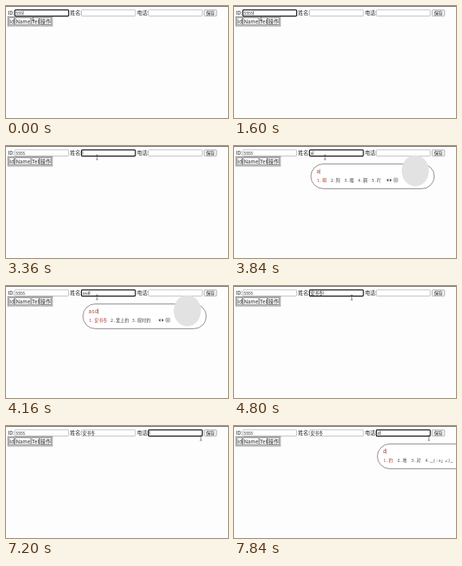
These frames come from a looping animation (278x140 px, 8 s). An HTML page:

```html
<!DOCTYPE html>
<html>
<head>
<meta charset="utf-8">
<style>
  html, body { margin: 0; height: 100%; overflow: hidden; background: #fdfdfd; }
  svg { display: block; width: 100vw; height: 100vh; }
  text { font: 6.4px "Noto Sans CJK SC", "Noto Sans", sans-serif; fill: #222; white-space: pre; }
  .value { font-size: 5.3px; }
  .box { fill: #fff; stroke: #999; stroke-width: .6; }
  .focus .box { stroke: #111; stroke-width: 1.2; }
  .caret { stroke: #111; stroke-width: .5; visibility: hidden; }
  .focus .caret { visibility: visible; }
  .cell { fill: none; stroke: #777; stroke-width: .8; }
  #popup text { font: 5.5px "Noto Sans Mono", "Noto Sans CJK SC", monospace; fill: #444; }
  #popup .hot { fill: #b8402f; }
  #popup #typed { font-size: 6.6px; }
</style>
</head>
<body>
<svg viewBox="0 0 278 140">
  <path d="M0 .4H278" stroke="#333" stroke-width=".8"/>
  <g id="page"></g>
  <g id="popup">
    <rect y="22.4" width="154.5" height="31" rx="15.5" fill="#fff" stroke="#7c6c6c" stroke-width=".8"/>
    <text id="typed" class="hot" y="34"></text>
    <path id="mark" stroke="#555" stroke-width=".5"/>
    <g id="choices"></g>
    <g id="pager">
      <path d="M193.4 40.7v4l-2.4-2zM195.2 40.7v4l2.4-2z" fill="#444"/>
      <rect x="200.3" y="40.3" width="4.6" height="4.6" rx=".8" fill="#fff" stroke="#555" stroke-width=".6"/>
      <path d="M201.4 42.6h2.4M202.6 41.4v2.4" stroke="#555" stroke-width=".6"/>
      <ellipse cx="227" cy="31" rx="17" ry="19.5" fill="#e2e2e2"/>
    </g>
  </g>
  <path id="ibeam" d="M-1.4-3H1.4M0-3V3M-1.4 3H1.4" fill="none" stroke="#444" stroke-width=".6"/>
  <path id="arrow" d="M0 0V6.6L1.6 5.2 2.7 7.6 3.7 7.1 2.6 4.8H4.7Z" fill="#fff" stroke="#222" stroke-width=".5"/>
</svg>
<script>
const LOOP = 8000, STEP = 160, NAME = '安书冬';
const $ = id => document.getElementById(id);
const label = (x, y, s, attrs = '') => `<text x="${x}" y="${y}" ${attrs}>${s}</text>`;

const field = (id, x, caption, captionX) => label(captionX, 11, caption) +
  `<g id="${id}"><rect class="box" x="${x}" y="4.8" width="67.5" height="7.8" rx="1"/>
   <text class="value" x="${x + 1.2}" y="10.7"></text><path class="caret"/></g>`;
const cell = (x, w, s) =>
  `<rect class="cell" x="${x}" y="14.7" width="${w}" height="8.8"/>` +
  label(x + w / 2, 21.5, s, 'text-anchor="middle"');

$('page').innerHTML =
  field('id', 11, 'ID:', 2.5) + field('name', 94.5, '姓名:', 80.3) + field('tel', 178.3, '电话:', 164) +
  '<rect x="248.2" y="4.8" width="15.6" height="7.8" rx="1" fill="#efefef" stroke="#888" stroke-width=".6"/>' +
  label(256, 10.7, '保存', 'class="value" text-anchor="middle"') +
  '<rect class="cell" x="2.4" y="13.2" width="55.6" height="11.8"/>' +
  cell(3.9, 6.7, 'Id') + cell(11.8, 19.1, 'Name') + cell(32.1, 9.5, 'Tel') + cell(42.8, 13.8, '操作');

// time, x, y of the mouse
const path = [
  [0, 34, 15.5], [1600, 34, 15.5], [2560, 106, 17], [2720, 109.8, 13], [2880, 109.8, 13],
  [3360, 114, 14], [4320, 114, 14], [4800, 147.5, 14.3], [5600, 233.5, 12.2],
  [6880, 233.5, 12.2], [7200, 244, 15], [LOOP, 244, 15]
];

function mouseAt(t) {
  const i = path.findIndex(p => p[0] > t);
  const [a, b] = [path[i - 1], path[i]];
  const k = (t - a[0]) / (b[0] - a[0]);
  return [a[1] + (b[1] - a[1]) * k, a[2] + (b[2] - a[2]) * k];
}

const endOf = text => +text.getAttribute('x') +
  (text.textContent ? text.getComputedTextLength() : 0) + .4;

function setField(id, value, focused) {
  const g = $(id), text = g.querySelector('text');
  text.textContent = value;
  g.classList.toggle('focus', focused);
  g.querySelector('.caret').setAttribute('d', `M${endOf(text)} 6.2V11.2`);
}

function showPopup(x, typed, words, gap, pager) {
  $('popup').querySelector('rect').setAttribute('x', x);
  $('typed').setAttribute('x', x + 7);
  $('typed').textContent = typed;
  $('mark').setAttribute('d', `M${endOf($('typed'))} 28.8V35`);
  $('choices').innerHTML = words.map((w, i) =>
    label(x + 7.5 + i * gap, 44.8, `${i + 1}.${w}`, i ? '' : 'class="hot"')).join('');
  $('pager').style.display = pager ? '' : 'none';
}

function popupAt(t) {
  if (t >= 7520) return [179.5, 'd', ['的', '地', '对', '_(:з」∠)_'], 17.4, false];
  if (t < 3840 || t >= 4480) return null;
  if (t < 4000) return [96.3, 'a', ['啊', '阿', '嘎', '锕', '吖'], 17.1, true];
  if (t < 4160) return [96.3, 'as', ['爱上', '按时', '暗示', '碍事'], 21, true];
  return [96.3, 'asd', [NAME, '爱上的', '按时的'], 27, true];
}

function draw(now) {
  const t = Math.floor(now % LOOP / STEP) * STEP;
  const popup = popupAt(t);
  const typed = popup ? popup[1] : '';
  setField('id', t < 480 ? '555' : '5555', t < 2720);
  setField('name', t >= 4480 ? NAME : typed, t >= 3040 && t < 5120);
  setField('tel', t >= 7520 ? typed : '', t >= 5440);

  $('popup').style.display = popup ? '' : 'none';
  if (popup) showPopup(...popup);

  const pointing = t >= 1760 && t < 3040;
  for (const id of ['ibeam', 'arrow']) {
    $(id).setAttribute('transform', `translate(${mouseAt(t)})`);
    $(id).style.display = (id === 'arrow') === pointing ? '' : 'none';
  }
  requestAnimationFrame(() => draw(performance.now() - start));
}

const start = performance.now();
draw(0);
</script>
</body>
</html>
```
